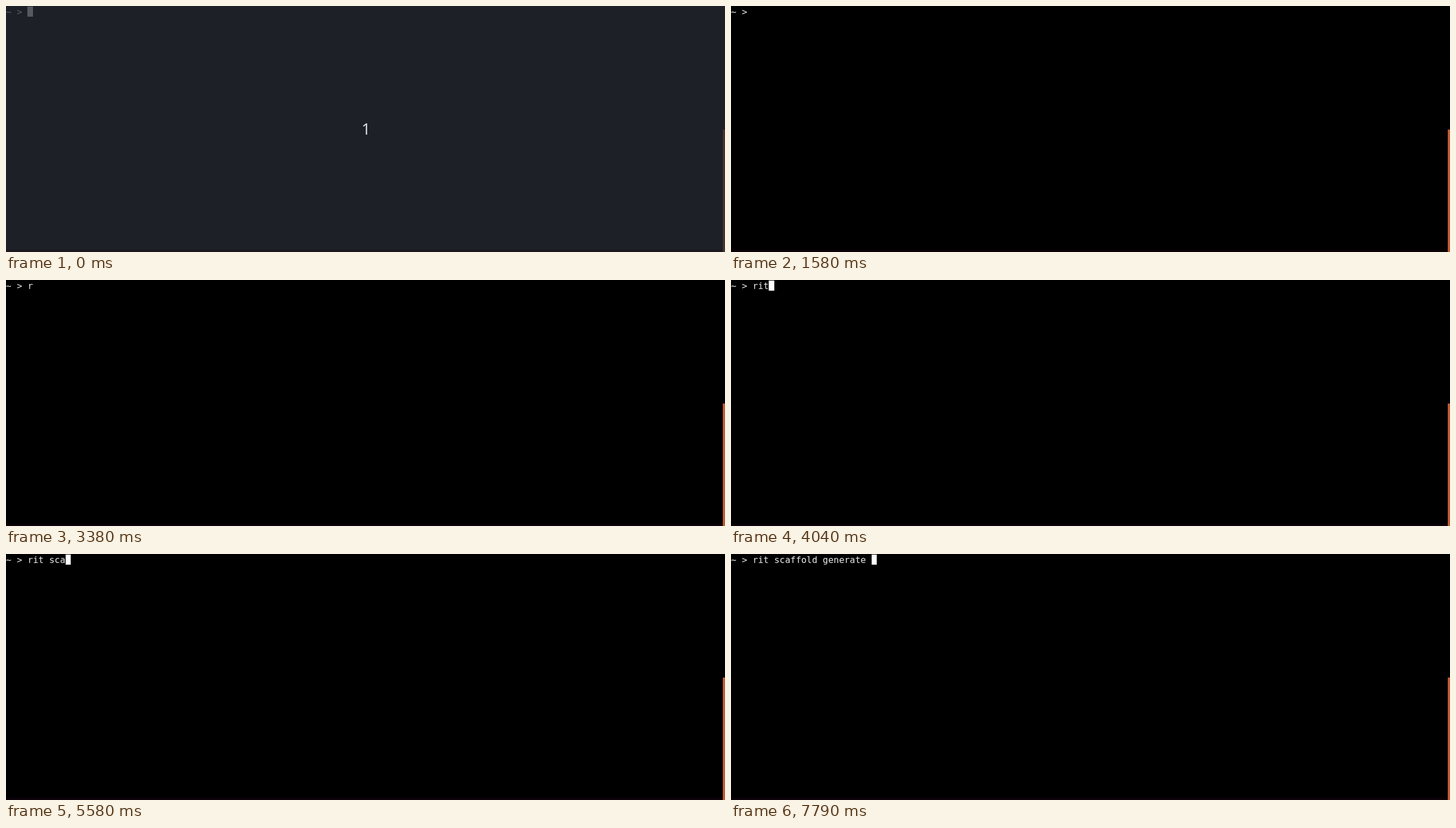
An HTML page with a canvas for the animation above (8 s loop, 1278 by 438 pixels).

```html
<!DOCTYPE html>
<html lang="en">
<head>
<meta charset="utf-8">
<style>
  html, body { margin: 0; width: 100%; height: 100%; overflow: hidden; background: #000; }
  canvas { display: block; }
</style>
</head>
<body>
<canvas id="stage" width="1278" height="438"></canvas>
<script>
const ctx = document.getElementById('stage').getContext('2d');
const LOOP = 8000, CELL = 9.6, PROMPT = '~ > ';
const BLINK = 590;        // half a blink; every key press restarts it
const ECHO = 40;          // delay from key press to text
const COMPLETION = 90;    // the same for tab completion

const KEYS = [
  { at: -210, text: '' },
  { at: 2790, text: 'r' }, { at: 3630, text: 'i' }, { at: 4000, text: 't' }, { at: 4500, text: ' ' },
  { at: 4840, text: 's' }, { at: 5250, text: 'c' }, { at: 5540, text: 'a' }, { at: 5870, text: 'ffold ' },
  { at: 6830, text: 'g' }, { at: 7380, text: 'e' }, { at: 7700, text: 'nerate ' }
];

const DIMMED = { back: '#1e2028', text: '#5c5e64', cursor: '#575960', side: '#46332f', bottom: '#1d181f' };
const NORMAL = { back: '#000', text: '#e9e9e9', cursor: '#fff', side: '#c05b36', bottom: '#0c0209' };

function rect(color, x, y, w, h) {
  ctx.fillStyle = color;
  ctx.fillRect(x, y, w, h);
}

function label(text, x, y, color, font) {
  ctx.fillStyle = color;
  ctx.font = font;
  ctx.fillText(text, x, y);
}

const echoTime = key => key.at + (key.text.length > 1 ? COMPLETION : ECHO);

function draw(time) {
  const counting = time < 40;
  const colors = counting ? DIMMED : NORMAL;
  const line = PROMPT + KEYS.filter(key => echoTime(key) <= time).map(key => key.text).join('');
  const lastPress = KEYS.findLast(key => key.at <= time).at;
  const cursorOn = Math.floor((time - lastPress) / BLINK) % 2 === 0;

  rect(colors.back, 0, 0, 1278, 438);
  rect(colors.bottom, 0, 434, 1278, 4);
  rect(colors.side, 1274, 220, 4, 218);

  ctx.textAlign = 'left';
  label(line, 0, 16, colors.text, '15.95px "DejaVu Sans Mono", monospace');
  if (cursorOn) {
    const left = Math.round(line.length * CELL);
    const right = Math.round((line.length + 1) * CELL);
    rect(colors.cursor, left, 1, right - left, 18);
  }
  if (counting) {
    ctx.textAlign = 'center';
    label('1', 640, 229, '#d3d7de', '28px "Noto Sans", sans-serif');
  }
}

const start = performance.now();
function tick() {
  draw((performance.now() - start) % LOOP);
  requestAnimationFrame(tick);
}
tick();
</script>
</body>
</html>
```
